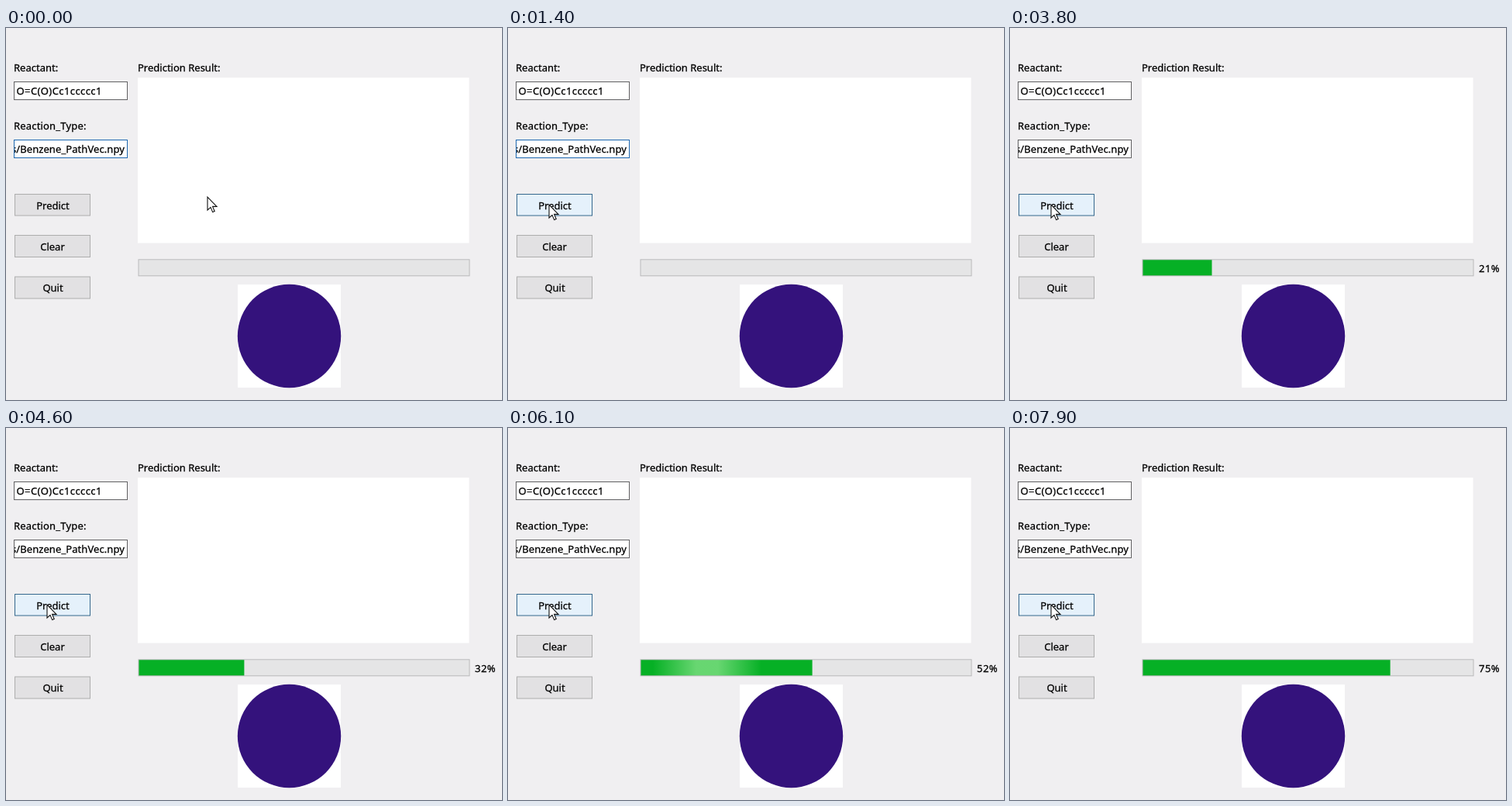
Write an HTML page that moves like this. It is 640 by 480 pixels and loops after 8000 ms.

```html
<!DOCTYPE html>
<html lang="en">
<head>
<meta charset="utf-8">
<title>Reaction prediction</title>
<style>
  html, body { margin: 0; width: 100%; height: 100%; overflow: hidden; background: #f0eff1; }
  svg { display: block; width: 640px; height: 480px; }
  text { font: 13px "Noto Sans", "Open Sans", sans-serif; fill: #000; stroke: #000; stroke-width: .28px; }
  .mid { text-anchor: middle; }
  .end { text-anchor: end; }
  .wide { letter-spacing: .4px; }
  .field { fill: #fff; stroke: #606062; }
  .focus { stroke: #1c67b0; }
  .button { fill: #e2e1e3; stroke: #adadad; }
  .hover { fill: #e5f1fb; stroke: #35688c; }
  .pressed { fill: #cce4f7; stroke: #22557f; }
</style>
</head>
<body>
<svg viewBox="0 0 640 480">
  <defs>
    <linearGradient id="shine">
      <stop offset="0" stop-color="#80e084" stop-opacity="0"/>
      <stop offset=".4" stop-color="#80e084" stop-opacity=".8"/>
      <stop offset=".6" stop-color="#80e084" stop-opacity=".8"/>
      <stop offset="1" stop-color="#80e084" stop-opacity="0"/>
    </linearGradient>
    <clipPath id="inField"><rect x="11" y="145" width="145" height="22"/></clipPath>
    <clipPath id="inBar"><rect id="barClip" x="171" y="299" width="0" height="21"/></clipPath>
  </defs>

  <text x="10" y="56">Reactant:</text>
  <rect class="field" x="10.5" y="69.5" width="146" height="23"/>
  <text class="wide" x="13.5" y="86">O=C(O)Cc1ccccc1</text>

  <text x="10" y="131" style="letter-spacing:.18px">Reaction_Type:</text>
  <rect id="typeField" class="field" x="10.5" y="144.5" width="146" height="23"/>
  <g clip-path="url(#inField)">
    <text class="end" x="153" y="161" style="letter-spacing:.08px">s/Benzene_PathVec.npy</text>
  </g>

  <rect id="predict" class="button" x="11.5" y="214.5" width="97" height="27.5"/>
  <text class="mid" x="60.5" y="233.5">Predict</text>
  <rect class="button" x="11.5" y="267.5" width="97" height="28"/>
  <text class="mid" x="60" y="287">Clear</text>
  <rect class="button" x="11.5" y="321" width="97" height="28"/>
  <text class="mid" x="60.5" y="340">Quit</text>

  <text x="170" y="56">Prediction Result:</text>
  <rect x="170" y="64" width="427.5" height="213.5" fill="#fff"/>

  <rect x="171" y="299" width="427" height="21" fill="#e5e5e6"/>
  <g clip-path="url(#inBar)">
    <rect x="171" y="299" width="427" height="21" fill="#06b025"/>
    <rect id="glow" y="299" width="140" height="21" fill="url(#shine)"/>
  </g>
  <rect x="171" y="298.8" width="427" height="21" fill="none" stroke="#bababb"/>
  <text id="percent" class="mid wide" x="618.5" y="314.5"></text>

  <rect x="299" y="331" width="133" height="133" fill="#fff"/>
  <circle cx="365.5" cy="397.5" r="66.7" fill="#34127c"/>

  <path id="cursor" d="M0 0V17L4 13.4L6.7 19.6L9.2 18.5L6.6 12.4H12Z" fill="#fff" stroke="#111" stroke-width="1.1"/>
</svg>
<script>
const LOOP = 8000;
const PRESS = 2100, RELEASE = 2200;
const progress = [[2200, 0], [2800, 8], [4600, 32], [6100, 52], [6800, 61], [7900, 75], [8000, 76.3]];
const pointer = [[100, 260, 218], [900, 53, 228]];
const shine = { start: 5150, period: 2600, speed: 0.27 };
const el = id => document.getElementById(id);
const clamp = v => Math.min(1, Math.max(0, v));

function percentAt(t) {
  const i = progress.findIndex(step => t < step[0]);
  if (i < 1) return 0;
  const [t0, p0] = progress[i - 1], [t1, p1] = progress[i];
  return Math.floor(p0 + (p1 - p0) * (t - t0) / (t1 - t0) + 1e-6);
}

function drawPointer(t) {
  const [[t0, x0, y0], [t1, x1, y1]] = pointer;
  const u = clamp((t - t0) / (t1 - t0));
  const k = u * u * (3 - 2 * u);
  const x = x0 + (x1 - x0) * k, y = y0 + (y1 - y0) * k;
  el('cursor').setAttribute('transform', `translate(${x} ${y})`);
  const pressed = t >= PRESS && t < RELEASE;
  const state = pressed ? ' pressed' : x < 109 ? ' hover' : '';
  el('predict').setAttribute('class', 'button' + state);
  el('typeField').setAttribute('class', t < PRESS ? 'field focus' : 'field');
}

function drawBar(t) {
  const p = percentAt(t);
  el('barClip').setAttribute('width', 4.262 * p);
  el('percent').textContent = t < RELEASE ? '' : p + '%';
  const phase = (t - shine.start + 2 * shine.period) % shine.period;
  el('glow').setAttribute('x', -70 + phase * shine.speed);
}

function frame(now) {
  const t = now % LOOP;
  drawPointer(t);
  drawBar(t);
  requestAnimationFrame(frame);
}
frame(0);
</script>
</body>
</html>
```
